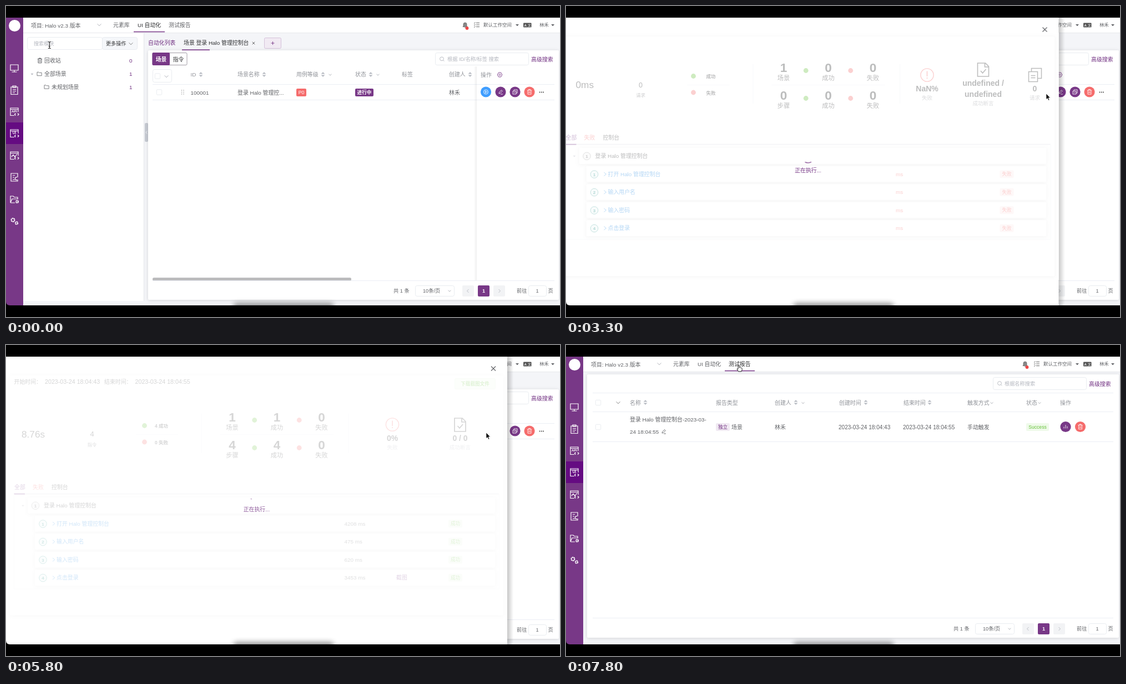
Animation, 998 px wide and 561 px high, one loop 8 s. Source, as an HTML page:

```html
<!DOCTYPE html>
<html lang="zh-CN">
<head>
<meta charset="utf-8">
<title>UI 自动化</title>
<style>
html, body { margin: 0; width: 998px; height: 561px; overflow: hidden; background: #000; }
svg { display: block; }
text { font-family: "Liberation Sans", "Noto Sans CJK SC", "Noto Sans CJK", sans-serif; fill: #606266; white-space: pre; }
.d { fill: #303133; } .g { fill: #909399; } .h { fill: #b4b7bf; }
.p { fill: #702f80; } .w { fill: #fff; } .r { fill: #f56c6c; }
.ok { fill: #67c23a; } .b { fill: #1682e0; } .t { fill: #12857c; }
.m { font-weight: 500; } .B { font-weight: 700; } .c { text-anchor: middle; }
.card { filter: drop-shadow(0 1px 3px rgba(0,0,0,.13)); }

#list, #reports, #drawer, #veil, #busy, #pending, #done, #tabline, #beam, #arrow, #hand {
  animation: 8s step-end infinite;
}
#list { animation-name: list; }
#reports { animation-name: reports; }
#tabline { animation-name: tabline; }
#drawer { animation-name: drawer; }
#veil { animation-name: veil; }
#busy { animation-name: busy; }
#pending { animation-name: pending; }
#done { animation-name: done; }
#beam { animation-name: beam; }
#arrow { animation-name: arrow; }
#hand { animation-name: hand; }
#spin { animation: spin 8s steps(80) infinite; }
#dash { animation: dash 8s ease-in-out infinite; }
#ring { stroke-dasharray: 100 100; animation: ring 8s cubic-bezier(.65,0,.35,1) infinite; }

@keyframes list { 0% { opacity: 1 } 93.75%, 100% { opacity: 0 } }
@keyframes reports { 0% { opacity: 0 } 93.75%, 100% { opacity: 1 } }
@keyframes tabline {
  0% { transform: translateX(61px) }
  1.25% { transform: translateX(12px) }
  2.5%, 100% { transform: none }
}
@keyframes drawer {
  0% { transform: translateX(-930px) }
  40% { transform: translateX(-587px) }
  41.25% { transform: translateX(-15.5px) }
  42.5% { transform: none }
  86.25%, 100% { transform: translateX(-930px) }
}
@keyframes veil {
  0% { opacity: .4 } 41.25% { opacity: .68 } 42.5% { opacity: .82 } 43.75% { opacity: .9 }
  72.5% { opacity: .8 } 73.75% { opacity: .35 } 75%, 100% { opacity: 0 }
}
@keyframes busy { 0% { opacity: 1 } 72.5% { opacity: .8 } 73.75% { opacity: .35 } 75%, 100% { opacity: 0 } }
@keyframes pending { 0% { opacity: 1 } 72.5%, 100% { opacity: 0 } }
@keyframes done { 0% { opacity: 0 } 72.5%, 100% { opacity: 1 } }
@keyframes spin { from { transform: rotate(-1046deg) } to { transform: rotate(1589deg) } }
@keyframes dash {
  0%, 39.71%, 49.97%, 60.22%, 70.47%, 100% { stroke-dasharray: 1 200; stroke-dashoffset: 0 }
  44.84%, 55.09%, 65.34% { stroke-dasharray: 90 150; stroke-dashoffset: -40 }
  49.96%, 60.21%, 70.46% { stroke-dasharray: 90 150; stroke-dashoffset: -120 }
}
@keyframes ring { 0%, 72.5% { stroke-dashoffset: 100 } 79.4%, 100% { stroke-dashoffset: 0 } }
@keyframes beam { 0% { opacity: 1 } 21.25%, 100% { opacity: 0 } }
@keyframes arrow {
  0% { opacity: 0 }
  21.25% { opacity: 1; transform: translate(517px,234px) }
  22.5% { opacity: 1; transform: translate(670px,297px) }
  25% { opacity: 1; transform: translate(680px,290px) }
  26.25% { opacity: 1; transform: translate(709px,270px) }
  27.5% { opacity: 1; transform: translate(758px,235px) }
  28.75% { opacity: 1; transform: translate(806px,201px) }
  30% { opacity: 1; transform: translate(840px,178px) }
  31.25% { opacity: 0; transform: translate(865px,158px) }
  40% { opacity: 1; transform: translate(865px,158px) }
  86.25%, 100% { opacity: 0; transform: translate(865px,158px) }
}
@keyframes hand {
  0% { opacity: 0 }
  31.25% { opacity: 1; transform: translate(857px,165px) }
  32.5% { opacity: 1; transform: translate(865px,160px) }
  40% { opacity: 0; transform: translate(312px,36px) }
  86.25%, 100% { opacity: 1; transform: translate(312px,36px) }
}
</style>
</head>
<body>
<svg id="stage" width="998" height="561" viewBox="0 0 998 561"></svg>
<script>
const PURPLE = '#783887', RED = '#f56c6c', GREEN = '#67c23a', LINE = '#ebeef5', EDGE = '#e4e7ed';
const USER = '林禾';

// y is the visual middle of the line
const T = (x, y, s, cls = '', size = 9.9) =>
  `<text x="${x}" y="${(y + size * .37).toFixed(2)}" class="${cls}" font-size="${size}">${s}</text>`;
const R = (x, y, w, h, fill, r = 0, extra = '') =>
  `<rect x="${x}" y="${y}" width="${w}" height="${h}" rx="${r}" fill="${fill}" ${extra}/>`;
const box = (x, y, w, h, r = 3, fill = '#fff', edge = EDGE) =>
  R(x + .5, y + .5, w - 1, h - 1, fill, r, `stroke="${edge}" stroke-width=".8"`);
const C = (x, y, r, fill, extra = '') => `<circle cx="${x}" cy="${y}" r="${r}" fill="${fill}" ${extra}/>`;
const I = (x, y, d, color = '#606266', w = 1, fill = 'none') =>
  `<path transform="translate(${x} ${y})" d="${d}" stroke="${color}" stroke-width="${w}" fill="${fill}"/>`;
const H = (x1, x2, y, color = LINE, w = 1) => I(0, 0, `M${x1} ${y}H${x2}`, color, w);
const V = (x, y1, y2, color = LINE) => I(0, 0, `M${x} ${y1}V${y2}`, color);
const tag = (x, y, w, s, fill, cls) => R(x, y - 7, w, 14, fill, 2) + T(x + w / 2, y, s, 'c ' + cls, 8.6);

const TRASH = 'M-4-3H4M-1.5-3V-4.5H1.5V-3M-3-3V4.2H3V-3M-1-.8V2.2M1-.8V2.2';
const FOLDER = 'M-4-3.2H-1L0-2.2H4.2V3.2H-4Z';
const WINDOW = 'M7 0V-7H-7V6.5H0M-7-4.5H7M2.5 2.5L.5 4.5L2.5 6.5M6 2.5L8 4.5L6 6.5';
const PEN = 'M-3 3L-2.4.6L1.5-3.4L3.2-1.6L-.6 2.3ZM0 4H4';
const PAPER = 'M-10-12H4L10-6V12H-10ZM3-12V-5H10M-4.5 2L-1 6L5-1';

const chev = (x, y, s = 1, color = '#a8abb2') => I(x, y, `M${-3.5 * s} ${-1.7 * s}L0 ${1.7 * s}L${3.5 * s} ${-1.7 * s}`, color, .9);
const caret = (x, y, s = 1, color = '#606266') => I(x, y, `M${-3 * s} ${-1.6 * s}H${3 * s}L0 ${1.8 * s}Z`, 'none', 0, color);
const sort = (x, y) => I(x, y, 'M-3.5-1L0-4.2L3.5-1ZM-3.5 1L0 4.2L3.5 1Z', 'none', 0, '#b4b8c0');
const check = (x, y) => box(x - 5.2, y - 5.2, 10.4, 10.4, 1.5);
const lens = (x, y) => C(x, y, 3.4, 'none', 'stroke="#b4b7bf" stroke-width=".9"') + I(x, y, 'M2.4 2.4L4.4 4.4', '#b4b7bf', .9);
const disc = (x, y, fill, d) => C(x, y, 9.6, fill) + I(x, y, d, '#fff', .85);

function sidebar() {
  const gear = (x, y, r) => C(x, y, r, 'none', 'stroke="#fff" stroke-width="2" stroke-dasharray="2.4 .6"');
  const icons = [
    [112, 'M-7-6H7V4H-7ZM0 4V7M-4.5 7H4.5'],
    [152, 'M-6-6H6V7.5H-6ZM-3-8H3V-5H-3ZM-3-1.5H3M-3 1.5H3M-3 4.5H1'],
    [191, WINDOW], [230, WINDOW],
    [270, WINDOW + 'M-5 2L-2-1.5L1 2L5-3'],
    [309, 'M6 0V-7H-6V7H6V4M-3-3.5H1M-3 0H0M-3 4H1M5 0A2.5 2.5 0 1 0 5 4.5'],
    [349, 'M-7 6V-6H-2L0-4H6V-1M-7 6L-4-1H7M-7 6H1']
  ];
  return R(0, 21, 31, 519, PURPLE) + R(0, 210, 31, 39, '#650b82') + C(15.5, 35.5, 10.5, '#fff') +
    icons.map(([y, d]) => I(15, y, d, '#fff', 1.2)).join('') +
    T(15, 190, 'API', 'w c B', 6) + T(15, 229, 'UI', 'w c B', 6.5) +
    gear(20, 353, 2) + gear(12.5, 386, 3) + gear(19, 391.5, 2.2);
}

function nav(active) {
  const items = [[193, '元素库'], [237, 'UI 自动化'], [293, '测试报告']];
  return R(31, 21, 967, 27.5, '#fff') + H(31, 998, 48.5, '#e6e8ec') +
    T(45, 35, '项目: Halo v2.3 版本') + chev(168, 34) +
    items.map(([x, s], i) => T(x, 34.5, s, i === active ? 'd m' : '')).join('') +
    (active === 1 ? R(230, 45.8, 56, 1.5, PURPLE) : R(286, 45.8, 54, 1.5, PURPLE)) +
    I(827, 34.5, 'M-4 3H4L3 1V-1.5A3 3 0 0 0-3-1.5V1ZM-1 4.5H1', '#666', .8, '#888') + C(830.5, 40, 2.9, '#f04848') +
    I(848, 34, 'M-1-3.5H5M-1 0H5M-1 3.5H5M-5-3.5L-4-2.6L-2.4-4.5M-5 0L-4 .9L-2.4-1M-5 3.5L-4 4.4L-2.4 2.5', '#555', .9) +
    T(860, 34, '默认工作空间', '', 8.5) + caret(921, 34.5) +
    R(932, 30.5, 14.5, 8, '#555', 1) + T(935.7, 34.5, 'A', 'w c B', 6) + T(942.7, 34.5, '文', 'w c', 5.5) +
    T(961, 34, USER, '', 8.4) + caret(985, 34.5);
}

function pager(y) {
  return T(698, y, '共 1 条', '', 9.2) + box(737, y - 10, 71, 20) + T(751, y, '10条/页', '', 9.2) + chev(799, y, .7) +
    R(822, y - 10, 21, 20, '#f2f3f5', 2) + I(832, y, 'M1.5-3L-1.5 0L1.5 3', '#b4b7bf', .9) +
    R(850, y - 10, 21, 20, PURPLE, 2) + T(860.5, y, '1', 'w c B', 9) +
    R(878, y - 10, 21, 20, '#f2f3f5', 2) + I(889, y, 'M-1.5-3L1.5 0L-1.5 3', '#b4b7bf', .9) +
    T(920, y, '前往', '', 9.2) + box(941, y - 10, 33, 20) + T(957, y, '1', 'c', 9.2) + T(976.5, y, '页', '', 9.2);
}

const heads = (y, list) => list.map(([x, s]) => T(x, y, s, 'g m')).join('');

function listPage() {
  const dots = [0, 1, 2].map(i => C(316.5, 152 + i * 3.4, .7, '#888') + C(320, 152 + i * 3.4, .7, '#888')).join('');
  return R(31, 21, 967, 519, '#f4f5f8') + sidebar() + nav(1) +
    R(31, 49, 217.5, 483, '#fff') + V(248.5, 49, 532, '#e3e5ea') +
    box(38, 56, 136, 23) + T(50, 67.5, '搜索模块', 'h', 9.1) +
    box(173, 56, 64, 23, 3, '#f5f7fa') + T(180, 67.5, '更多操作', 'd', 9.1) + chev(225, 68, 1, '#777') +
    I(61, 98.5, TRASH) + T(69, 98.5, '回收站') + T(222, 98.5, '0', 'p') +
    caret(47, 123, .8, '#b4b7bf') + I(60, 122.5, FOLDER, '#606266', .8) + T(69, 122.5, '全部场景') + T(222, 122.5, '1', 'p') +
    I(73, 146, FOLDER, '#606266', .8) + T(82, 146, '未规划场景') + T(222, 146, '1', 'p') +
    R(250, 211, 6, 34, '#c6cad2', 2) + I(253, 228, 'M1-2.5L-1 0L1 2.5', '#fff', .8) +
    T(256, 66.5, '自动化列表', 'p m') + T(320, 66.5, '场景 登录 Halo 管理控制台', 'd m') +
    I(446, 67, 'M-2.3-2.3L2.3 2.3M2.3-2.3L-2.3 2.3', '#555', .9) +
    box(465, 57, 31, 20, 2, '#f1eaf3', '#cdb6d3') + I(480.5, 67, 'M-3 0H3M0-3V3', PURPLE, .9) +
    R(256, 80, 740, 450, '#fff', 2, 'class="card"') + `<g id="tabline">${R(256, 78.4, 50, 1.6, PURPLE)}</g>` +
    box(263.5, 84, 63, 23, 2, '#fff', '#8b8590') + R(263.5, 84, 31.5, 23, PURPLE, 2) +
    T(279.5, 96, '场景', 'w c B', 9.8) + T(310.5, 96, '指令', 'd c', 9.8) +
    box(773, 84, 169, 23) + lens(785, 95.3) + T(795, 95.7, '根据 ID/名称/标签 搜索', 'h', 9.2) + T(946, 96.5, '高级搜索', 'p m') +
    box(264, 114, 35, 24, 3) + check(273, 126.5) + chev(289, 127) +
    heads(123.5, [[332.5, 'ID'], [417, '场景名称'], [523, '用例等级'], [629, '状态'], [713, '标签'], [798, '创建人']]) +
    [351, 465, 571, 657, 836].map(x => sort(x, 123.5)).join('') + chev(584, 124, .7) + chev(670, 124, .7) +
    H(264, 988, 141.5) + H(264, 988, 169.5) + check(276, 155.5) + dots +
    T(332.5, 156, '100001') + T(417, 156, '登录 Halo 管理控...') +
    tag(523, 156, 18, 'P0', RED, 'w') + tag(629, 156, 33, '进行中', PURPLE, 'w B') + T(798, 156, USER) +
    R(843, 109, 5, 386, 'url(#fold)') + R(848, 109, 140, 386, '#fff') + H(848, 988, 141.5) + H(848, 988, 169.5) +
    T(855, 124, '操作', 'g m') + I(889.5, 124, 'M-2-4H2L4.3 0L2 4H-2L-4.3 0Z', PURPLE, .9) + C(889.5, 124, 1.5, 'none', `stroke="${PURPLE}" stroke-width=".8"`) +
    disc(864.5, 155, '#409eff', 'M-1-2L2 0L-1 2ZM4 0A4 4 0 1 0-4 0A4 4 0 1 0 4 0') +
    disc(891, 155, PURPLE, PEN) +
    disc(917, 155, PURPLE, 'M-4-1.5H2V4H-4ZM-2-1.5V-4H4V2H2M-2.5 1.2H.5') + disc(943, 155, RED, TRASH) +
    [961.5, 964.8, 968].map(x => C(x, 155.5, 1, '#444')).join('') +
    R(264, 490, 358, 5.4, '#bbbbbd', 2.5) + H(264, 988, 495.5) + pager(514);
}

function reportPage() {
  return R(31, 21, 967, 519, '#f4f5f8') + sidebar() + nav(2) + R(38, 53, 958, 475, '#fff', 2, 'class="card"') +
    box(769, 58, 169, 23) + lens(781, 69) + T(790, 69.5, '根据名称搜索', 'h', 9.2) + T(942, 70, '高级搜索', 'p m') +
    H(48, 986, 86.5) + check(58, 104) + chev(94, 104, 1, '#777') +
    heads(104, [[115, '名称'], [270, '报告类型'], [376, '创建人'], [492, '创建时间'], [608, '结束时间'], [723, '触发方式'], [829, '状态'], [890, '操作']]) +
    [143, 414, 540, 655].map(x => sort(x, 103.5)).join('') + [427, 767, 853].map(x => chev(x, 104.5, .7)).join('') +
    H(48, 986, 120.5) + check(58, 148) +
    T(115, 134, '登录 Halo 管理控制台-2023-03-') + T(115, 156, '24 18:04:55') + I(176, 156, PEN, '#606266', .9) +
    tag(270, 148, 25, '独立', '#f0e9f2', 'p') + T(298, 148, '场景') + T(376, 148, USER) +
    T(491, 148, '2023-03-24 18:04:43', '', 10.05) + T(607, 148, '2023-03-24 18:04:55', '', 10.05) + T(723, 148, '手动触发') +
    tag(829, 148, 41, 'Success', '#effaea', 'ok') +
    disc(900, 147.5, PURPLE, 'M-3 3V0M0 3V-3.5M3 3V-1') + disc(926.5, 147.5, RED, TRASH) +
    H(48, 986, 174.5) + H(48, 986, 492.5) + pager(512);
}

const warn = (x, y) => C(x, y, 11.6, 'none', `stroke="${RED}" stroke-width="1.4"`) + I(x, y, 'M0-7V2.5M0 4.5V6.5', RED, 1.6);

// lower part shared by both report states; dy shifts it down once the header line exists
function steps(dy, done) {
  const rows = [['打开 Halo 管理控制台', 4208], ['输入用户名', 475], ['输入密码', 620], ['点击登录', 3453]];
  const total = (y, n) => n.map((v, i) => {
    const x = 407.5 + i * 80.5;
    return T(x, y, v, 'd c B', 22.5) + T(x, y + 19, [y < 150 ? '场景' : '步骤', '成功', '失败'][i], 'd c', 11.2) +
      (i ? C(x - 40.3, y + 6, 4.4, i === 1 ? GREEN : RED) : '');
  }).join('');
  const row = ([s, ms], i) => {
    const y = 303.3 + dy + i * 32.5;
    return R(52, y - 14.5, 829, 29, '#fff', 2, 'class="card"') +
      C(66.5, y + .3, 6.8, '#eef8f7', 'stroke="#3a9d95" stroke-width=".9"') + T(66.5, y + .3, i + 1, 't c B', 8) +
      I(86, y, 'M-2-3.2L1.8 0L-2 3.2', '#1682e0', .9) + T(91, y, s, 'b m') +
      T(609.5, y, done ? ms + ' ms' : 'ms', done ? '' : 'r') + (done && i === 3 ? T(703, y, '截图', 'p') : '') +
      tag(797, y, 25, done ? '成功' : '失败', done ? '#edf8e8' : '#feeaea', done ? 'ok' : 'r');
  };
  return total(110.5 + dy, done ? [1, 1, 0] : [1, 0, 0]) + total(160.5 + dy, done ? [4, 4, 0] : [0, 0, 0]) +
    H(386, 590, 142.5 + dy) + V(352.5, 105 + dy, 176 + dy) + V(617, 105 + dy, 176 + dy) + H(234, 310, 142.5 + dy) +
    T(15, 237 + dy, '全部', 'p m') + T(48, 237 + dy, '失败', 'r m') + T(82, 237 + dy, '控制台', 'd m') +
    H(14, 888, 249.6 + dy, '#e0e2e8', 1.6) + R(14.5, 248.8 + dy, 19.5, 1.7, PURPLE) +
    I(0, 0, `M14.5 ${250 + dy}V${421 + dy}H888.5V${250 + dy}`, '#f1f2f5') +
    R(39, 256 + dy, 842, 29, '#fff', 2, 'class="card"') + caret(30.5, 271 + dy, .8, '#b4b7bf') +
    C(53, 270.8 + dy, 6.8, '#f2f2f2', 'stroke="#999" stroke-width=".9"') + T(53, 270.8 + dy, '1', 'c B', 8) +
    T(68, 270.3 + dy, '登录 Halo 管理控制台', 'd') + rows.map(row).join('');
}

function pending() {
  return T(33, 141.5, '0ms', 'd', 17.2) + T(150, 142, '0', 'd c', 12.5) + T(150, 161, '请求', 'c', 8.3) +
    C(245, 126.5, 4.4, GREEN) + T(268, 127, '成功', 'd B', 8.5) + C(245, 156, 4.4, RED) + T(268, 156.5, '失败', 'd B', 8.5) +
    steps(0, false) + warn(666, 124.5) + T(666, 149, 'NaN%', 'd c B', 14) + T(666, 165, '失败', 'g c', 9.5) +
    I(767, 115, PAPER, '#303133', 1.6) + T(767, 139, 'undefined /', 'd c B', 14) + T(767, 159, 'undefined', 'd c B', 14) + T(767, 175, '成功断言', 'g c', 9.5) +
    I(860, 124.5, 'M-11-6H5V12H-11ZM-6-6V-12H12V6H5M-7 1H1M-7 5H1', '#303133', 1.5) + T(860, 149, '0', 'd c B', 14) + T(860, 165, '请求', 'g c', 9.5);
}

function finished() {
  return T(14.5, 66, '开始时间：', 'd') + T(70, 66, '2023-03-24 18:04:43', 'd', 10.7) +
    T(177, 66, '结束时间：', 'd') + T(232.5, 66, '2023-03-24 18:04:55', 'd', 10.7) +
    box(808, 60, 74, 20, 2, '#eff9ea', '#dff2d5') + T(845, 69.5, '下载截图文件', 'ok c B', 8.6) +
    T(28, 160.5, '8.76s', 'd', 17.2) +
    `<circle id="ring" cx="155" cy="160.5" r="42" fill="none" stroke="#73c751" stroke-width="4" pathLength="100" transform="rotate(-90 155 160.5)"/>` +
    T(155, 160.5, '4', 'd c', 13) + T(155, 180, '指令', 'c', 8.3) +
    C(249.5, 145.5, 4.4, GREEN) + T(268, 146, '4 成功', 'd B', 8.5) + C(249.5, 175, 4.4, RED) + T(268, 175.5, '0 失败', 'd B', 8.5) +
    steps(19, true) + warn(696, 143.5) + T(696, 168, '0%', 'd c B', 14) + T(696, 184, '失败', 'h c', 9.6) +
    I(818, 144, PAPER, '#303133', 1.7) + T(818, 168, '0 / 0', 'd c B', 14) + T(818, 184, '成功断言', 'h c', 9.6);
}

function drawer() {
  return R(903, 21, 11, 519, 'url(#shade)') + R(-30, 21, 933, 519, '#fff') +
    I(878, 42.5, 'M-4-4L4 4M4-4L-4 4', '#606266', 1.1) + R(7, 55, 889, 432.5, '#fff', 2, 'class="card"') +
    `<g id="pending">${pending()}</g><g id="done">${finished()}</g>` +
    `<g id="veil">${R(0, 48, 903, 446, '#fff')}</g><g id="busy"><g transform="translate(451.5 271) scale(.59)"><g id="spin">` +
    `<circle id="dash" r="20" fill="none" stroke="${PURPLE}" stroke-width="2.1" stroke-linecap="round"/></g></g>` +
    T(451.5, 296.5, '正在执行...', 'p c') + '</g>';
}

document.getElementById('stage').innerHTML = `
<defs>
  <clipPath id="screen"><path d="M0 21H998V540H7Q0 540 0 533Z"/></clipPath>
  <linearGradient id="shade"><stop stop-color="#000" stop-opacity=".22"/><stop offset="1" stop-color="#000" stop-opacity="0"/></linearGradient>
  <linearGradient id="fold"><stop stop-color="#000" stop-opacity="0"/><stop offset="1" stop-color="#000" stop-opacity=".06"/></linearGradient>
  <filter id="soft" x="-20%" y="-200%" width="140%" height="500%"><feGaussianBlur stdDeviation="5"/></filter>
</defs>
<rect width="998" height="561"/>
<g clip-path="url(#screen)">
  <g id="list">${listPage()}</g>
  <g id="reports">${reportPage()}</g>
  <g id="drawer">${drawer()}</g>
  <rect x="409" y="536" width="182" height="14" rx="7" opacity=".42" filter="url(#soft)"/>
</g>
<g id="beam">${I(78.3, 70.5, 'M-2.5-6Q0-6 0-4.5Q0-6 2.5-6M0-4.5V4.5M-2.5 6Q0 6 0 4.5Q0 6 2.5 6M-1.5 2H1.5', '#222', 1.1)}</g>
<g id="arrow">${I(0, 0, 'M0 0V10.6L2.4 8.4L4.1 12.3L5.8 11.5L4.2 7.8H7.4Z', '#fff', .7, '#000')}</g>
<g id="hand">${I(0, 0, 'M-2 .8Q-1-.6 0 .8V4.6Q1 3.8 1.8 4.9Q2.9 4.3 3.6 5.4Q5 5 5.2 6.6V8.6L4 11.8H-1.4L-4 7.6Q-3.8 6-2 7.4Z', '#111', .9, '#fff')}</g>`;
</script>
</body>
</html>
```
